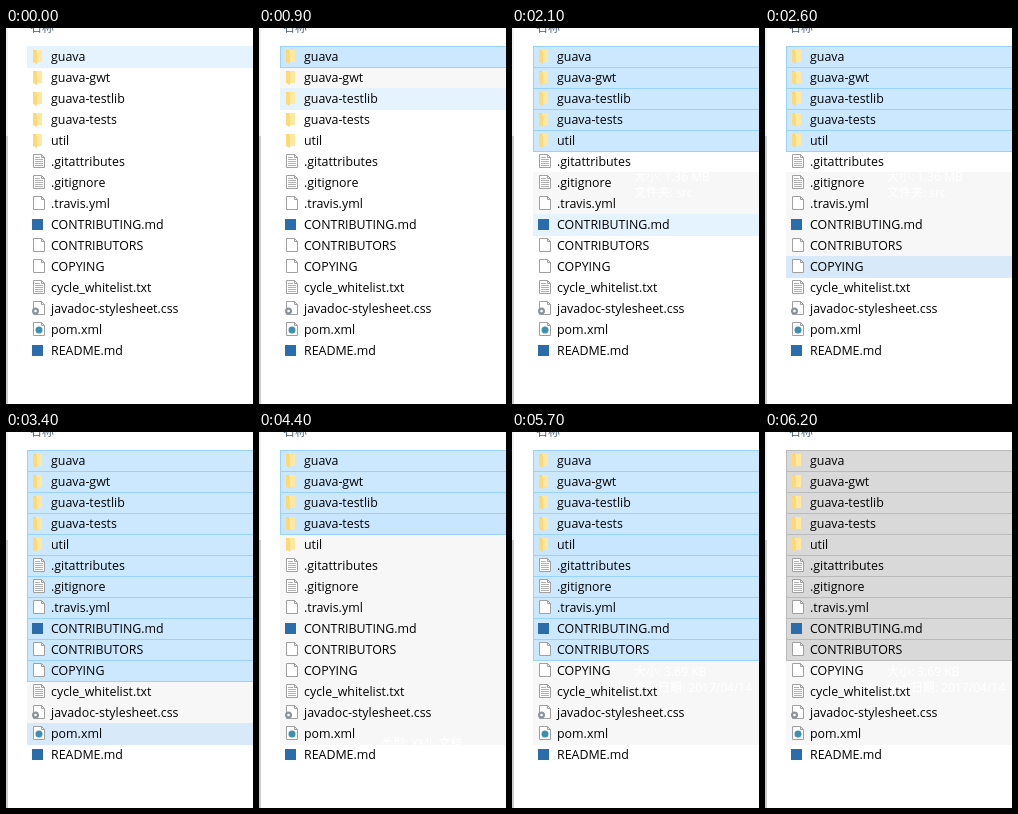
Recreate the animation shown at these times as an HTML page with a canvas. Size 247 by 376 pixels, loop 6.3 s.

```html
<!DOCTYPE html>
<html lang="zh">
<head>
<meta charset="utf-8">
<title>File list selection</title>
<style>
html, body { margin: 0; width: 100%; height: 100%; overflow: hidden; background: #fff; }
canvas { display: block; }
</style>
</head>
<body>
<canvas id="stage" width="247" height="376"></canvas>
<script>
const ctx = document.getElementById('stage').getContext('2d');
const LOOP = 6300, BLUR = 6200, STEP = 100, LEFT = 21, TOP = 18, PITCH = 21;

const names = ['guava', 'guava-gwt', 'guava-testlib', 'guava-tests', 'util',
  '.gitattributes', '.gitignore', '.travis.yml', 'CONTRIBUTING.md', 'CONTRIBUTORS',
  'COPYING', 'cycle_whitelist.txt', 'javadoc-stylesheet.css', 'pom.xml', 'README.md'];

const date = '修改日期: 2017/04/14';

// The pointer glides over rows from..to, may show a tip, then a click selects rows 0..to
const gestures = [
  { start: 0, end: 0, from: 0, to: 0, click: 600 },
  { start: 800, end: 1100, from: 1, to: 4, click: 1600,
    tip: { bottom: 176, lines: ['创建日期: 2017/04/14', '大小: 1.36 MB', '文件夹: src'] } },
  { start: 1900, end: 2400, from: 6, to: 10, click: 2700 },
  { start: 2900, end: 3100, from: 11, to: 13, click: 3500,
    tip: { bottom: 355, lines: ['类型: XML 文档', '大小: 8.27 KB', date] } },
  { start: 3800, end: 4200, from: 11, to: 3, click: 4400 },
  { start: 5000, end: 5300, from: 6, to: 9, click: 5500,
    tip: { bottom: 267, lines: ['类型: 文件', '大小: 3.69 KB', date] } },
  { start: 5700, end: 5900, from: 4, to: 1, click: Infinity }
];

function rowAt(g, t) {
  const p = Math.min(1, (t - g.start) / (g.end - g.start || 1));
  return Math.round(g.from + (g.to - g.from) * p);
}

function rect(color, x, y, w, h) {
  ctx.fillStyle = color;
  ctx.fillRect(x, y, w, h);
}

function frame(color, x, y, w, h) {
  ctx.strokeStyle = color;
  ctx.strokeRect(x + .5, y + .5, w - 1, h - 1);
}

function shape(fill, stroke, ...points) {
  ctx.beginPath();
  points.forEach(([x, y]) => ctx.lineTo(x, y));
  ctx.closePath();
  ctx.fillStyle = fill;
  ctx.fill();
  if (stroke) {
    ctx.strokeStyle = stroke;
    ctx.stroke();
  }
}

function disc(color, x, y, r) {
  ctx.fillStyle = color;
  ctx.beginPath();
  ctx.arc(x, y, r, 0, 7);
  ctx.fill();
}

function page() {
  shape('#fff', '#a0a0a0', [27.5, 3.5], [35.5, 3.5], [38.5, 6.5], [38.5, 16.5], [27.5, 16.5]);
  shape('#eee', '#a0a0a0', [35.5, 3.5], [35.5, 6.5], [38.5, 6.5]);
}

function folder() {
  rect('#f5d06c', 27, 4, 9, 12);
  rect('#ffe8a0', 30, 4, 6, 12);
  shape('#ffd976', null, [27, 4], [31, 6], [31, 18], [27, 16]);
}

function textPage() {
  page();
  for (let y = 6; y < 16; y += 2) rect('#b0b0b0', 29, y, y < 8 ? 5 : 8, 1);
}

function gearPage() {
  page();
  disc('#8a949c', 29.5, 13, 3.5);
  disc('#fff', 29.5, 13, 1.3);
}

function discPage() {
  page();
  disc('#3f8fae', 33, 11, 3.5);
}

const icons = {
  md: () => rect('#2b6cab', 26, 5, 11, 11),
  css: gearPage, xml: discPage, yml: page,
  txt: textPage, gitattributes: textPage, gitignore: textPage
};

function iconFor(name) {
  if (/^(guava|util)/.test(name)) return folder;
  return icons[name.split('.').pop()] || page;
}

function write(text, x, y, color, size = 12) {
  ctx.font = `${size}px "Open Sans", "Noto Sans CJK SC", "Noto Sans CJK", sans-serif`;
  ctx.fillStyle = color;
  ctx.fillText(text, x, y);
}

function drawTip({ bottom, lines }, faded) {
  const h = lines.length * 16 + 5, y = bottom - h;
  if (!faded) {
    rect('#fff', 117, y, 130, h);
    frame('#767676', 117, y, 130, h);
  }
  lines.forEach((line, i) => write(line, 122, y + 14 + 16 * i, faded ? '#fff' : '#575757'));
}

function bar(row, fill, line) {
  const y = TOP + PITCH * row;
  rect(fill, LEFT, y, 226, 22);
  if (line) frame(line, LEFT, y, 230, 22);
}

function draw(t) {
  const begun = gestures.filter(g => t >= g.start);
  const now = begun.at(-1);
  const picks = gestures.filter(g => t >= g.click).map(g => g.to);
  const last = picks.at(-1) ?? -1;
  const hover = rowAt(now, t);
  const pressed = now.start > 0 && t >= now.click - STEP;
  const active = t < BLUR;

  rect('#fff', 0, 0, 247, 376);
  rect('#f0f0f0', 0, 0, 2, 108);
  rect('#cdcdcd', 0, 108, 2, 268);
  write('名称', 24, 4, '#4c607a');

  // Rows already left keep a faint tint
  const touched = row => picks.some(p => row <= p) ||
    begun.some(g => row >= Math.min(g.from, rowAt(g, t)) && row <= Math.max(g.from, rowAt(g, t)));
  names.forEach((_, row) => touched(row) && bar(row, '#f7f7f7'));

  const tipped = begun.filter(g => g.tip && t >= g.end).at(-1);
  const tipOpen = tipped && t < tipped.click - STEP;
  if (tipped && !tipOpen) drawTip(tipped.tip, true);

  if (hover > last) bar(hover, pressed ? '#d8eaf9' : '#e5f3ff');
  for (let row = 0; row <= last; row++) {
    if (active) bar(row, row === hover ? '#c8e6ff' : '#cce8ff', '#99d1ff');
    else bar(row, '#d9d9d9', '#bababa');
  }

  names.forEach((name, row) => {
    const y = TOP + PITCH * row;
    ctx.save();
    ctx.translate(0, y);
    iconFor(name)();
    ctx.restore();
    write(name, 45, y + 15, '#000', 12.4);
  });

  if (tipOpen) drawTip(tipped.tip);
}

const start = performance.now();
function tick() {
  const t = (performance.now() - start) % LOOP;
  draw(Math.floor(t / STEP) * STEP);
  requestAnimationFrame(tick);
}
tick();
</script>
</body>
</html>
```
